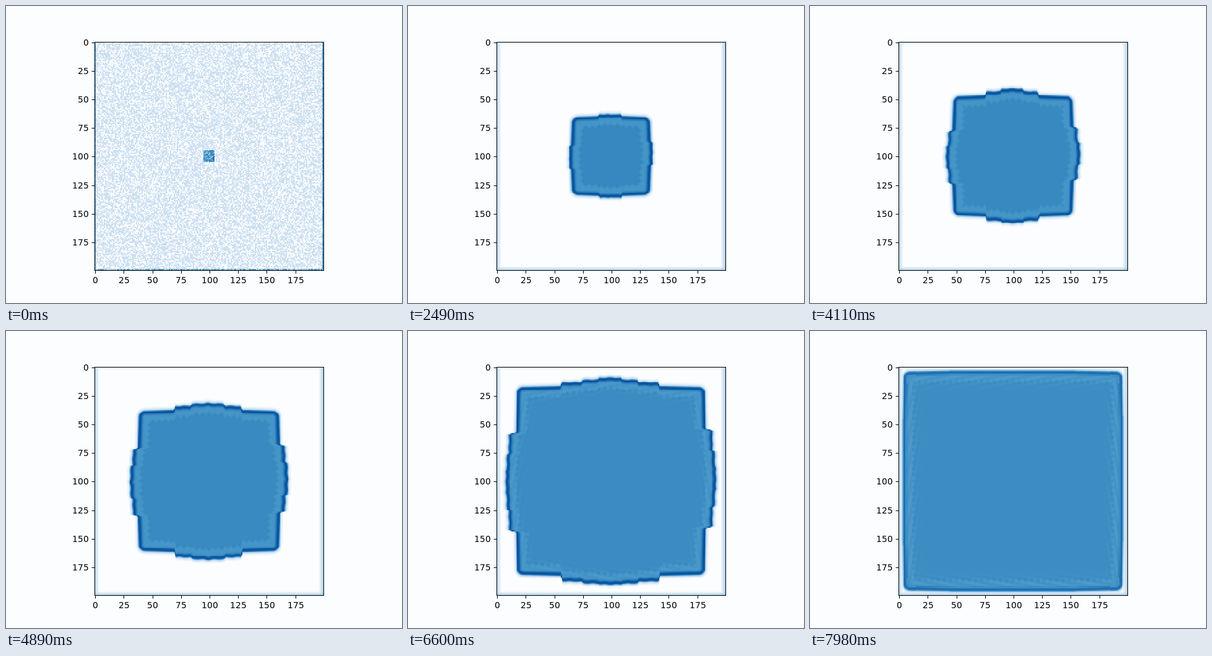
An HTML page with a canvas that plays this animation: 640x480 px, repeating every 8 s.

```html
<!DOCTYPE html>
<html lang="en">
<head>
<meta charset="utf-8">
<title>Reaction front</title>
<style>
html, body { margin: 0; width: 100%; height: 100%; overflow: hidden; background: #fcfdff; }
canvas { display: block; }
</style>
</head>
<body>
<canvas id="stage" width="640" height="480"></canvas>
<script>
const N = 200, MID = 99.5, LOOP = 8000, STEP = 30;
const LEFT = 143.2, TOP = 57.6, SIZE = 369.6, CELL = SIZE / N, DIGIT = 9;
const ctx = document.getElementById('stage').getContext('2d');
const grid = document.createElement('canvas');
grid.width = grid.height = N;
const gridCtx = grid.getContext('2d');
const image = gridCtx.createImageData(N, N);

const clamp = (v, lo, hi) => Math.max(lo, Math.min(hi, v));
const mix = (a, b, k) => a + (b - a) * k;
const smooth = (lo, hi, v) => {
  const k = clamp((v - lo) / (hi - lo), 0, 1);
  return k * k * (3 - 2 * k);
};

// Piecewise linear lookup through [position, value] points.
function curve(points, x) {
  if (x <= points[0][0]) return points[0][1];
  for (let i = 1; i < points.length; i++) {
    const [x1, y1] = points[i];
    if (x <= x1) {
      const [x0, y0] = points[i - 1];
      return mix(y0, y1, (x - x0) / (x1 - x0));
    }
  }
  return points[points.length - 1][1];
}

const stops = ['fcfdff', 'deebf7', 'c6dbef', '9ecae1', '6baed6', '4292c6', '2171b5', '08519c', '08306b']
  .map(hex => [0, 2, 4].map(i => parseInt(hex.slice(i, i + 2), 16)));
const palette = Array.from({ length: 257 }, (_, i) => {
  const k = Math.min(i / 32, 7.999), n = Math.floor(k);
  return stops[n].map((c, j) => Math.round(mix(c, stops[n + 1][j], k - n)));
});

let seed = 71;
function random() {
  seed = (seed + 0x6D2B79F5) | 0;
  let r = Math.imul(seed ^ (seed >>> 15), 1 | seed);
  r = (r + Math.imul(r ^ (r >>> 7), 61 | r)) ^ r;
  return ((r ^ (r >>> 14)) >>> 0) / 4294967296;
}
const noise = Float32Array.from({ length: N * N }, random);

// Height limits of the three terraces on each side, and a shift along the side.
const sides = {
  left:   { steps: [6.4, 1.4, 0.4], shift: 1 },
  right:  { steps: [6, 1.6, 0.6], shift: -2 },
  top:    { steps: [3.2, 1.9, 1.5], shift: -1 },
  bottom: { steps: [4.8, 1.4, 0.6], shift: -0.5 }
};
const terraces = [[1.25, 8, 1.2], [2.5, 6, 1.2], [4.6, 5, 1]]; // birth, spread, rise per second

// Distance from the centre to the front for each cell along one side.
function sideProfile({ steps, shift }, half, t) {
  const out = new Float32Array(N);
  const slope = 1.8 * clamp((t - 1.2) / 2, 0, 1);
  const dent = 1.1 * smooth(0.5, 1, t) * (1 - smooth(1.8, 3.2, t));
  for (let i = 0; i < N; i++) {
    const raw = i - MID, s = Math.abs(raw - shift);
    let edge = half + slope * Math.max(0, 1 - Math.abs(raw) / half);
    terraces.forEach(([birth, spread, rise], n) => {
      const age = t - birth;
      if (age <= 0) return;
      const width = spread * age, inside = 1 - smooth(width - 1.2, width + 1.2, s);
      edge += inside * Math.min(steps[n], rise * age);
      if (n === 0) edge += 0.2 * inside * Math.cos(s * 0.62);
    });
    edge -= dent * Math.exp(-raw * raw / 4);
    out[i] = Math.min(edge, 96.2);
  }
  return out;
}

const front = [[-3.6, 0], [-2.4, 0.07], [-1.3, 0.2], [-0.5, 0.42], [0.3, 0.8], [1, 0.89],
  [1.8, 0.86], [2.7, 0.73], [3.6, 0.65], [4.6, 0.615], [7.5, 0.615], [10, 0.66]];
const rim = [[0, 0.3], [1, 0.19], [2, 0.12], [3, 0.02], [3.5, 0]];

function texture(x, y, d, along, t) {
  const diag = Math.cos(0.72 * (x + y)) + Math.cos(0.72 * (x - y));
  const early = 0.028 * (1 - smooth(1.3, 2.4, t)) * diag;
  const beads = 0.022 * Math.exp(-((d - 9) ** 2) / 2) * Math.cos(along * 1.15);
  const late = -0.017 * smooth(4, 7.8, t) * Math.exp(-((d - 7) ** 2) / 40)
    * (0.5 + Math.cos(d * 1.3 + along * 0.25));
  return early + beads + late;
}

function fillGrid(t) {
  const age = t - 1.17;
  const half = Math.min(95.3, 20 + 10.2 * age + 0.22 * age * age - 3.4 * Math.exp(-t / 0.2));
  const edge = {};
  for (const name in sides) edge[name] = sideProfile(sides[name], half, t);
  const base = mix(0.672, 0.644, clamp((t - 1) / 7, 0, 1));
  const grain = Math.exp(-t / 0.05), haze = Math.exp(-t / 0.2), seedMix = Math.exp(-t / 0.1);
  const wane = 1 - 0.12 * smooth(7.2, 7.98, t);

  for (let j = 0; j < N; j++) {
    for (let i = 0; i < N; i++) {
      const k = j * N + i, x = i - MID, y = j - MID, n = noise[k];
      const ax = Math.abs(x), ay = Math.abs(y);
      const a = (x < 0 ? edge.left : edge.right)[j] - ax;
      const b = (y < 0 ? edge.top : edge.bottom)[i] - ay;
      const round = 5;
      const d = a < round && b < round ? round - Math.hypot(round - a, round - b) : Math.min(a, b);

      let v = 0;
      if (d > -4) {
        v = curve(front, d);
        if (d > 0 && d < 3) v *= wane;
        if (d > 3.5) {
          if (d > 7.5) v = mix(0.615, base, clamp((d - 7.5) / 2.5, 0, 1));
          v += texture(x, y, d, a < b ? y : x, t);
        }
      }

      const sideRim = curve(rim, Math.min(i, N - 1 - i));
      const endRim = curve(rim, j < MID ? j + 1 : N - 1 - j);
      const border = Math.max(sideRim, endRim) + 0.3 * Math.min(sideRim, endRim);
      v = Math.max(v, border * (1 - haze));

      if (t < 1) {
        const inSeed = ax < 5 && ay < 5;
        const speck = smooth(0.25, 0.65, n) - 0.55;
        const start = inSeed ? 0.4 + 0.36 * n : 0.12 * haze + speck * 0.22 * grain;
        v = inSeed ? mix(v, start, seedMix)
          : Math.max(d > -4 ? v * (1 - seedMix) : v, start);
        if (i === 0 || i === N - 1) v = Math.max(v, (0.46 + 0.2 * n) * haze);
        else if (j === N - 1) v = Math.max(v, (0.3 + 0.4 * n) * haze);
      }

      const c = palette[Math.round(clamp(v, 0, 1) * 256)];
      image.data.set([c[0], c[1], c[2], 255], k * 4);
    }
  }
  gridCtx.putImageData(image, 0, 0);
}

// Digits sit on whole pixels with an even advance.
function drawNumber(n, x, y) {
  [...String(n)].forEach((digit, i) => ctx.fillText(digit, Math.round(x) + i * DIGIT, y));
}

function drawAxes() {
  ctx.strokeStyle = ctx.fillStyle = '#000';
  ctx.lineWidth = 1;
  ctx.strokeRect(143.5, 58.5, 370, 369);
  ctx.font = '13.89px "DejaVu Sans", sans-serif';
  ctx.textBaseline = 'alphabetic';
  ctx.beginPath();
  for (let n = 0; n < N; n += 25) {
    const x = LEFT + (n + 0.5) * CELL, y = TOP + (n + 0.5) * CELL;
    const px = Math.floor(x + 0.5) + 0.5, py = Math.floor(y + 0.5) + 0.5;
    const width = String(n).length * DIGIT;
    ctx.moveTo(px, 428);
    ctx.lineTo(px, 432.5);
    ctx.moveTo(143, py);
    ctx.lineTo(138.5, py);
    drawNumber(n, x + 0.5 - width / 2, 448);
    drawNumber(n, 134 - width, Math.round(y + 5));
  }
  ctx.stroke();
}

let shown = -1;
function draw(now) {
  const time = Math.floor((now % LOOP) / STEP) * STEP;
  if (time !== shown) {
    shown = time;
    fillGrid(time / 1000);
    ctx.fillStyle = '#fcfdff';
    ctx.fillRect(0, 0, 640, 480);
    ctx.imageSmoothingEnabled = false;
    ctx.drawImage(grid, LEFT, TOP, SIZE, SIZE);
    drawAxes();
  }
}

const begin = performance.now();
function tick() {
  draw(performance.now() - begin);
  requestAnimationFrame(tick);
}
tick();
</script>
</body>
</html>
```
